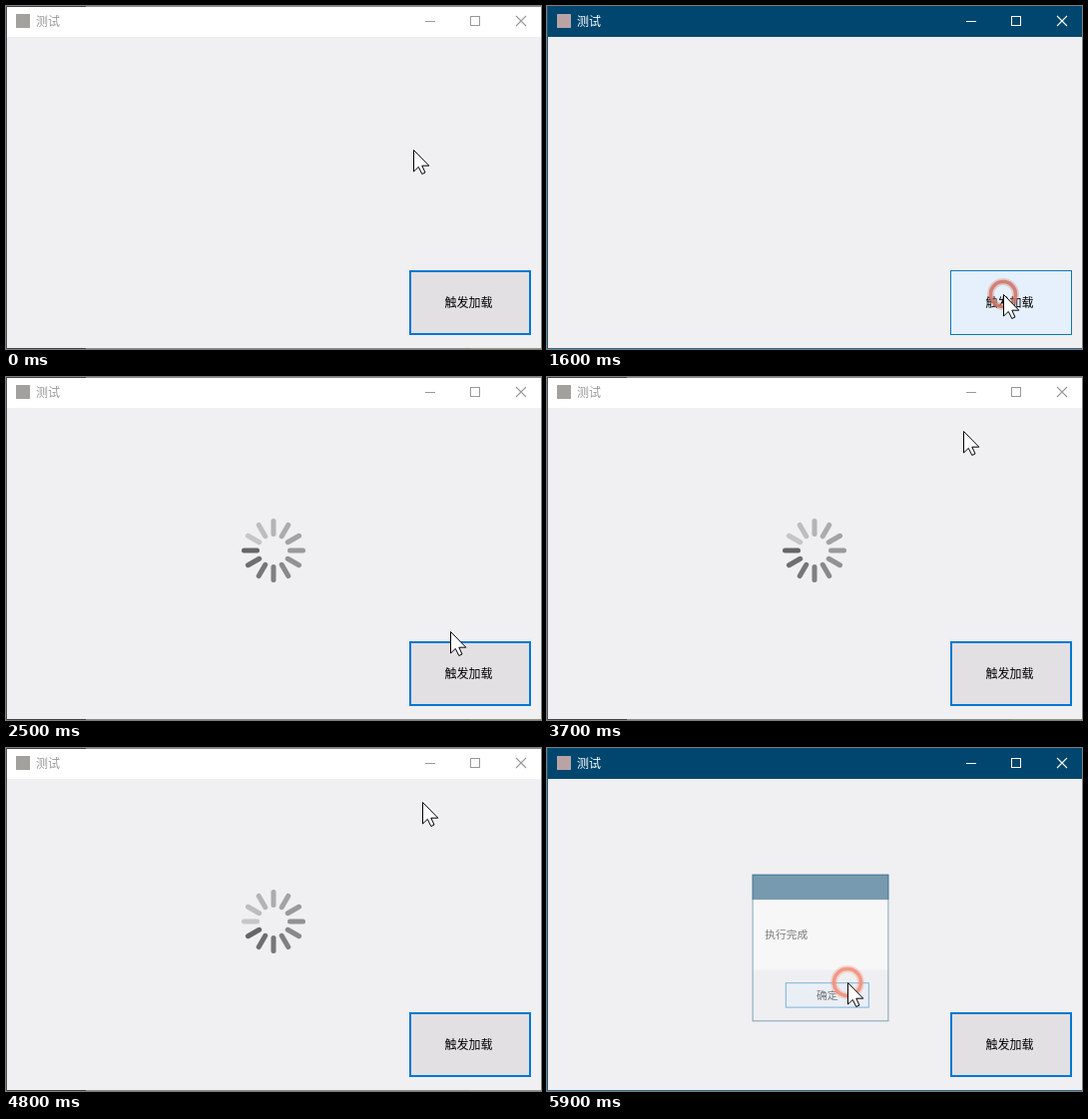
An HTML page with a canvas for the animation above (6 s loop, 536x344 px).

```html
<!DOCTYPE html>
<html lang="zh-CN">
<head>
<meta charset="utf-8">
<style>
html, body { margin: 0; width: 100%; height: 100%; overflow: hidden; background: #f0eff1; }
canvas { display: block; }
</style>
</head>
<body>
<canvas id="stage" width="536" height="344"></canvas>
<script>
const ctx = document.getElementById('stage').getContext('2d');
const LOOP = 6000, STEP = 100;
const FACE = '#f0eff1', NAVY = '#00466f', BLUE = '#0078d0';
const FONT = '"Noto Sans CJK SC", "Noto Sans CJK", sans-serif';

// Cursor path: time, x, y
const PATH = [
  [0, 408, 144], [200, 408, 144], [900, 457, 289], [2200, 457, 289],
  [2500, 445, 255], [3100, 417, 54], [4800, 417, 54],
  [5400, 302, 234], [5500, 301, 235], [LOOP, 301, 235]
];

const between = (t, from, to) => t >= from && t < to;

function cursorAt(t) {
  const i = PATH.findIndex(p => p[0] > t);
  const [t0, x0, y0] = PATH[i - 1], [t1, x1, y1] = PATH[i];
  const u = (t - t0) / (t1 - t0), k = u * u * (3 - 2 * u);
  return [Math.round(x0 + (x1 - x0) * k), Math.round(y0 + (y1 - y0) * k)];
}

function box(x, y, w, h, color) {
  ctx.fillStyle = color;
  ctx.fillRect(x, y, w, h);
}

function frame(x, y, w, h, color, line = 1) {
  ctx.strokeStyle = color;
  ctx.lineWidth = line;
  ctx.strokeRect(x + line / 2, y + line / 2, w - line, h - line);
}

function label(text, x, y, size, color) {
  ctx.font = `${size}px ${FONT}`;
  ctx.fillStyle = color;
  ctx.fillText(text, x, y);
}

function cross(x, y, color) {
  ctx.strokeStyle = color;
  ctx.lineWidth = 1.1;
  ctx.beginPath();
  ctx.moveTo(x - 5, y - 5);
  ctx.lineTo(x + 5, y + 5);
  ctx.moveTo(x + 5, y - 5);
  ctx.lineTo(x - 5, y + 5);
  ctx.stroke();
}

function button(x, y, w, h, state) {
  const [fill, edge, line] = {
    focus: ['#e2e0e3', BLUE, 2],
    hover: ['#e5f0fc', '#0e76b4', 1],
    pressed: ['#cce4f7', '#005499', 1]
  }[state];
  box(x, y, w, h, fill);
  frame(x, y, w, h, edge, line);
}

function mainWindow(active) {
  const ink = active ? '#fff' : '#999';
  box(0, 0, 536, 344, FACE);
  box(0, 0, 536, 31, active ? NAVY : '#fff');
  if (active) {
    box(0, 0, 1, 344, '#12577f');
    box(0, 343, 536, 1, '#2b6a90');
  } else {
    for (const y of [0, 343]) {
      box(0, y, 536, 1, '#8c8c8c');
      box(0, y, 80, 1, '#424446');
    }
    box(465, 343, 71, 1, '#93977f');
    box(0, 0, 1, 344, '#4c5358');
  }
  box(10, 8, 14, 14, active ? '#b9a3a5' : '#a3a19d');
  label('测试', 30, 20, 12, ink);
  box(420, 15, 10, 1, ink);
  frame(465, 10, 10, 10, ink);
  cross(516, 15, ink);
}

function spinner(t) {
  const head = t / STEP + 8;
  ctx.lineWidth = 5;
  ctx.lineCap = 'round';
  for (let i = 0; i < 12; i++) {
    const lag = (((head - i) % 12) + 12) % 12;
    const shade = Math.round(102 + lag * 8.7);
    const a = i * Math.PI / 6, dx = Math.sin(a), dy = -Math.cos(a);
    ctx.strokeStyle = `rgb(${shade},${shade},${shade})`;
    ctx.beginPath();
    ctx.moveTo(268 + dx * 16.5, 174 + dy * 16.5);
    ctx.lineTo(268 + dx * 29.5, 174 + dy * 29.5);
    ctx.stroke();
  }
  ctx.lineCap = 'butt';
}

function dialog(scale, alpha, state, closing) {
  ctx.save();
  ctx.globalAlpha = alpha;
  ctx.translate(274, 200.5);
  ctx.scale(scale, scale);
  ctx.translate(-274, -200.5);
  box(204, 125, 140, 151, FACE);
  box(204, 151, 140, 72, '#fff');
  box(204, 125, 140, 26, NAVY);
  frame(204, 125, 140, 151, '#0d547e');
  if (!closing) cross(328, 138, '#fff');
  label('执行完成', 217, 191, 11, '#000');
  button(238, 236, 86, 26, state);
  label('确定', 270, 253, 11, '#000');
  ctx.restore();
}

function clickRing(x, y, radius, color) {
  for (const [width, alpha] of [[7, 0.3], [3.5, 0.85]]) {
    ctx.globalAlpha = alpha;
    ctx.strokeStyle = color;
    ctx.lineWidth = width;
    ctx.beginPath();
    ctx.arc(x, y, radius, 0, 2 * Math.PI);
    ctx.stroke();
  }
  ctx.globalAlpha = 1;
}

const arrow = new Path2D('M.5 .5V22L5.3 17.4L8.8 24.5L12 23L8.8 16.2H15.8Z');

function pointer(x, y) {
  ctx.save();
  ctx.translate(x, y);
  ctx.fillStyle = '#fff';
  ctx.strokeStyle = '#000';
  ctx.lineWidth = 1;
  ctx.fill(arrow);
  ctx.stroke(arrow);
  ctx.restore();
}

function draw(t) {
  const [x, y] = cursorAt(t);
  const closing = t >= 5900;
  mainWindow(between(t, 1400, 1800) || between(t, 4900, 5000) || closing);

  const over = t < 1800 && x >= 404 && y >= 265;
  button(404, 265, 122, 65, between(t, 1400, 1600) ? 'pressed' : over ? 'hover' : 'focus');
  label('触发加载', 439.5, 302, 12, '#000');

  if (between(t, 1800, 4900)) spinner(t);
  if (t >= 5000) {
    const state = between(t, 5700, 5900) ? 'pressed' : t >= 5500 ? 'hover' : 'focus';
    const opening = t < 5100;
    dialog(opening ? 0.95 : closing ? 0.977 : 1, opening || closing ? 0.5 : 1, state, closing);
  }

  if (between(t, 1400, 1700)) clickRing(x, y, 12.5, '#d07463');
  if (t >= 5700) clickRing(x, y, 13.5, '#f18e79');
  pointer(x, y);
}

function tick() {
  const t = performance.now() % LOOP;
  draw(Math.floor(t / STEP) * STEP);
  requestAnimationFrame(tick);
}
tick();
</script>
</body>
</html>
```
